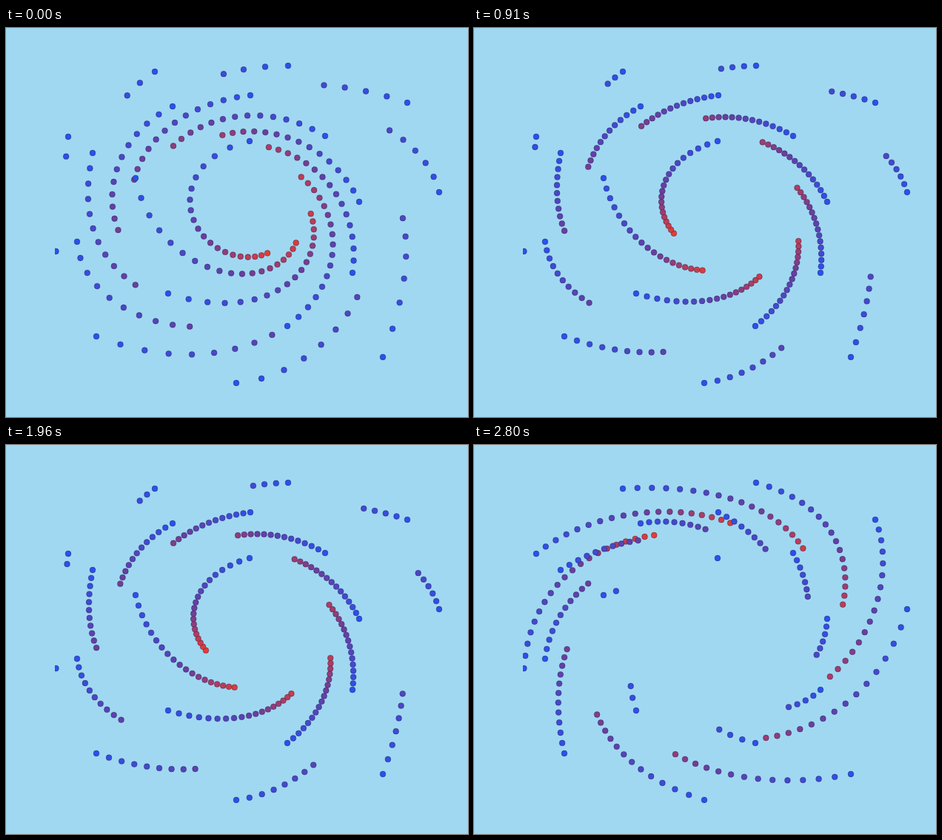
Recreate the animation shown at these times as an HTML page with a canvas. Size 624 px wide and 526 px high, loop 2870 ms.

```html
<!DOCTYPE html>
<html lang="en">
<head>
<meta charset="utf-8">
<title>De Casteljau spiral</title>
<style>
  html, body { margin: 0; overflow: hidden; background: #a0d8f2; }
  canvas { display: block; }
</style>
</head>
<body>
<canvas id="stage" width="624" height="526"></canvas>
<script>
const ctx = document.getElementById('stage').getContext('2d');
const STEP_MS = 70, STEPS = 41, CLIP_LEFT = 66;

// Key points of one Bézier curve, from the inside of the spiral outwards;
// every other dot is computed from them
const control = [
  [329, 153], [175, 203], [219, 359], [380, 403], [468, 331],
  [477, 235], [431, 146], [330, 91], [225, 106], [117, 169],
  [96, 289], [122, 417], [311, 480], [509, 445], [585, 222],
  [542, 101], [381, 51], [201, 59], [84, 147], [67.5, 302]
];
const blue = [44, 80, 238], purple = [108, 62, 156], red = [232, 60, 50];
const PURPLE_AT = 0.55;

const mix = (a, b, t) => a.map((v, i) => v + (b[i] - v) * t);

function levelColor(u) {
  const c = u < PURPLE_AT
    ? mix(blue, purple, u / PURPLE_AT)
    : mix(purple, red, (u - PURPLE_AT) / (1 - PURPLE_AT));
  return `rgb(${c.map(Math.round)})`;
}

// All stages of De Casteljau's algorithm, from the control points to the curve point
function casteljau(t) {
  const levels = [control];
  while (levels[0].length > 1) {
    const prev = levels[0];
    levels.unshift(prev.slice(1).map((p, i) => mix(prev[i], p, t)));
  }
  return levels;
}

function dot([x, y]) {
  ctx.beginPath();
  ctx.arc(x, y, 3.9, 0, Math.PI * 2);
  ctx.fill();
  ctx.stroke();
}

// The parameter runs 0 to 1 every 15 steps; the first step is a little longer
function parameter(step) {
  return step ? (0.2235 + step / 15) % 1 : 0.172;
}

function draw(t) {
  ctx.clearRect(0, 0, 624, 526);
  ctx.save();
  ctx.beginPath();
  ctx.rect(CLIP_LEFT, 0, 624 - CLIP_LEFT, 526);
  ctx.clip();
  ctx.strokeStyle = 'rgba(20, 20, 50, 0.35)';
  // Lower levels lie on top
  for (const points of casteljau(t)) {
    ctx.fillStyle = levelColor(1 - (points.length - 1) / (control.length - 1));
    points.forEach(dot);
  }
  ctx.restore();
}

const start = performance.now();
function tick() {
  const elapsed = performance.now() - start;
  draw(parameter(Math.floor(elapsed / STEP_MS) % STEPS));
  requestAnimationFrame(tick);
}
tick();
</script>
</body>
</html>
```
